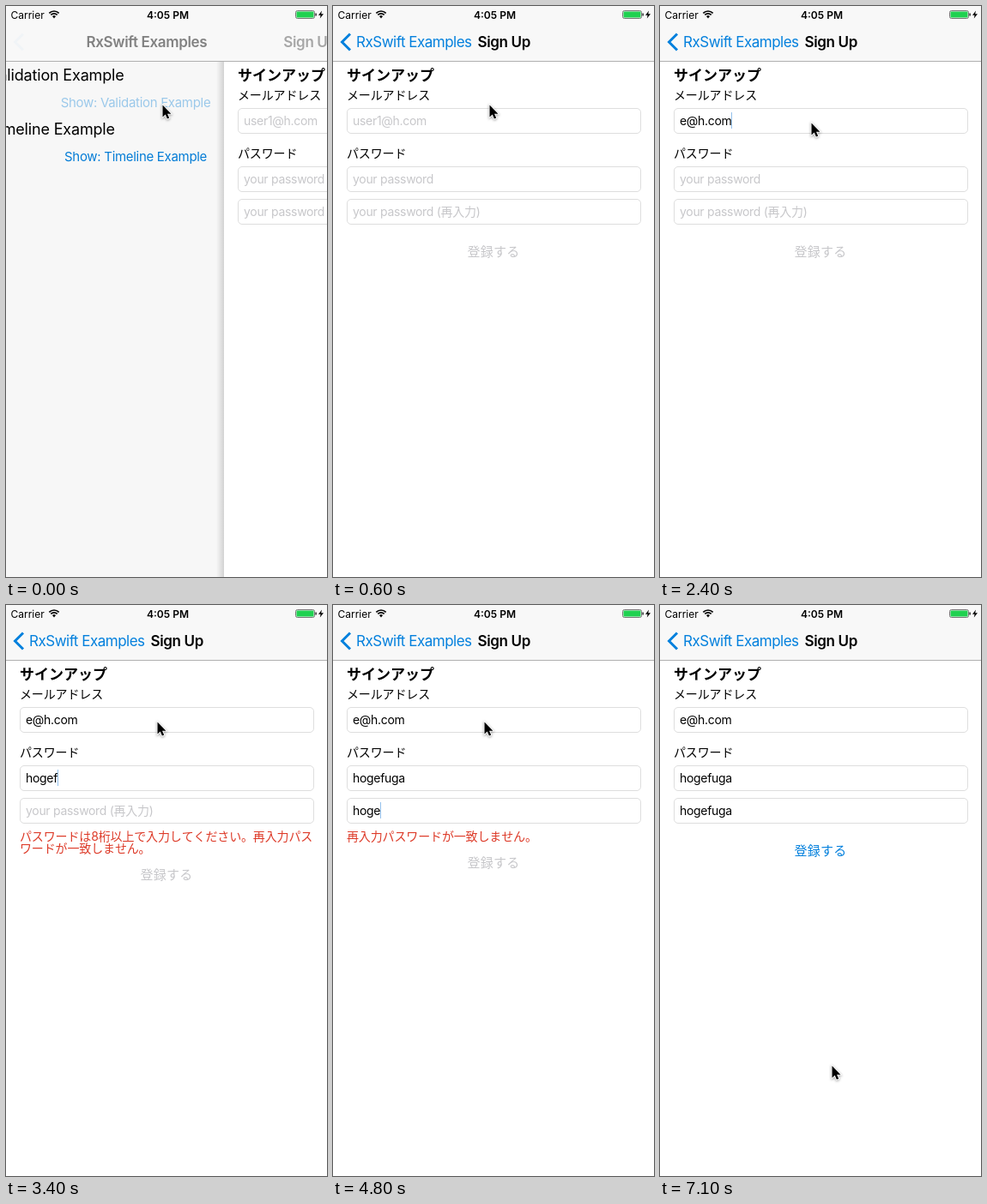
These frames come from a looping animation (374 by 666 pixels, 7.2 s). An HTML page with a canvas:

```html
<!DOCTYPE html>
<html lang="ja">
<head>
<meta charset="utf-8">
<title>Sign Up</title>
<style>
html, body { margin: 0; width: 100%; height: 100%; overflow: hidden; background: #fff; }
canvas { display: block; width: 374px; height: 666px; }
</style>
</head>
<body>
<canvas id="stage"></canvas>
<script>
const W = 374, H = 666, LOOP = 7200, STEP = 100;
const BLUE = '#0480dd', RED = '#dd3a28', PALE = '#c7c7ca', BLACK = '#000';
const FAMILY = 'Inter, "Noto Sans CJK JP", sans-serif';
const EMAIL = 'e@h.com', PASSWORD = 'hogefuga';

const canvas = document.getElementById('stage');
const ctx = canvas.getContext('2d');
const ratio = window.devicePixelRatio || 1;
canvas.width = W * ratio;
canvas.height = H * ratio;

const clamp = v => Math.max(0, Math.min(1, v));
const smooth = v => v * v * (3 - 2 * v);

function text(str, x, y, { size = 14, weight = 400, color = BLACK, spacing = 0, align = 'left', alpha = 1 } = {}) {
  ctx.save();
  ctx.font = `${weight} ${size}px ${FAMILY}`;
  ctx.letterSpacing = spacing + 'px';
  ctx.textAlign = align;
  ctx.fillStyle = color;
  ctx.globalAlpha = alpha;
  ctx.fillText(str, x, y);
  const width = ctx.measureText(str).width;
  ctx.restore();
  return width;
}

function polygon(points) {
  ctx.beginPath();
  points.forEach(([x, y]) => ctx.lineTo(x, y));
  ctx.closePath();
}

// Part of `str` typed so far, given the time of each keystroke.
const typed = (str, t, times) => str.slice(0, times.filter(at => t >= at).length);
const steady = (start, count) => Array.from({ length: count }, (_, i) => start + i * STEP);

function formState(t) {
  const email = typed(EMAIL, t, [1300, 1500, 1800, ...steady(2000, 4)]);
  const password = typed(PASSWORD, t, steady(3000, 8));
  const repeat = typed(PASSWORD, t, steady(4500, 8));
  const emailError = email && email.length < 6 ? ['メールアドレスを正しく入力してください。'] : [];
  let passwordError = [];
  if (password && password.length < 8) {
    passwordError = ['パスワードは8桁以上で入力してください。再入力パス', 'ワードが一致しません。'];
  } else if (password !== repeat) {
    passwordError = ['再入力パスワードが一致しません。'];
  }
  let focus = -1;
  if (t >= 1200 && t < 6000) focus = t < 2800 ? 0 : t < 4100 ? 1 : 2;
  return { email, password, repeat, emailError, passwordError, focus, ready: repeat === PASSWORD };
}

function field(y, value, hint, caretAlpha) {
  ctx.beginPath();
  ctx.roundRect(16.5, y + .5, 342, 29, 4.5);
  ctx.fillStyle = '#fff';
  ctx.fill();
  ctx.strokeStyle = '#dedede';
  ctx.lineWidth = 1;
  ctx.stroke();
  const width = text(value || hint, 23, y + 20, { color: value ? BLACK : PALE, spacing: -.3 });
  if (caretAlpha) {
    ctx.globalAlpha = caretAlpha;
    ctx.fillStyle = '#3c8fdc';
    ctx.fillRect(Math.floor(23 + (value ? width : 0)), y + 5, 1, 19);
    ctx.globalAlpha = 1;
  }
}

function signUpPage(t, x) {
  const s = formState(t);
  const label = { spacing: -.14 };
  const error = { ...label, color: RED };
  const caret = i => s.focus === i ? (t >= 5600 ? .3 : .55) : 0;
  ctx.save();
  ctx.translate(x, 0);
  if (x > 0) {
    const shade = ctx.createLinearGradient(-9, 0, 0, 0);
    shade.addColorStop(0, 'rgba(0,0,0,0)');
    shade.addColorStop(1, `rgba(0,0,0,${.22 * x / W})`);
    ctx.fillStyle = shade;
    ctx.fillRect(-9, 64, 9, H);
  }
  ctx.fillStyle = '#fff';
  ctx.fillRect(0, 64, W, H);
  text('サインアップ', 16, 86.5, { size: 17, weight: 700 });
  text('メールアドレス', 16, 109, label);
  field(119, s.email, 'user1@h.com', caret(0));
  s.emailError.forEach(line => text(line, 16, 169, error));
  let shift = 14 * s.emailError.length;
  text('パスワード', 16, 177 + shift, label);
  field(187 + shift, s.password, 'your password', caret(1));
  field(225 + shift, s.repeat, 'your password (再入力)', caret(2));
  s.passwordError.forEach((line, i) => text(line, 16, 275 + shift + 14 * i, error));
  shift += 14 * s.passwordError.length;
  const pressed = t >= 6100 && t < 6400;
  text('登録する', 187, 291.5 + shift, {
    size: 15, spacing: .2, align: 'center', color: s.ready ? BLUE : PALE, alpha: pressed ? .35 : 1
  });
  ctx.restore();
}

function menuPage(t, progress) {
  ctx.save();
  ctx.translate(-112 * progress, 0);
  const heading = { size: 18, spacing: -.17 };
  const link = { size: 15, spacing: -.3, align: 'center', color: BLUE };
  text('Validation Example', 16, 87, heading);
  text('Show: Validation Example', 187, 118, { ...link, alpha: t < 100 ? .38 : 1 });
  text('Timeline Example', 16, 150, heading);
  text('Show: Timeline Example', 187, 181, link);
  ctx.restore();
  ctx.fillStyle = `rgba(0,0,0,${.1 * progress})`;
  ctx.fillRect(0, 64, W, H);
}

function statusBar() {
  text('Carrier', 5.5, 14.5, { size: 12 });
  text('4:05 PM', 188.5, 14.5, { size: 12, weight: 600, align: 'center' });
  ctx.strokeStyle = ctx.fillStyle = BLACK;
  ctx.lineWidth = 1.7;
  [5.2, 8].forEach(r => {
    ctx.beginPath();
    ctx.arc(56, 14, r, -Math.PI * .75, -Math.PI * .25);
    ctx.stroke();
  });
  ctx.beginPath();
  ctx.moveTo(56, 14.5);
  ctx.arc(56, 14, 2.8, -Math.PI * .75, -Math.PI * .25);
  ctx.fill();

  ctx.lineWidth = 1;
  ctx.strokeStyle = '#777';
  ctx.beginPath();
  ctx.roundRect(337.5, 5.5, 22, 9, 2);
  ctx.stroke();
  ctx.fillStyle = '#1fd150';
  ctx.fillRect(338.5, 6.5, 20, 7);
  ctx.fillStyle = BLACK;
  ctx.fillRect(360.5, 8.5, 1.2, 3);
  polygon([[368, 5.5], [364, 10.7], [366.6, 10.7], [365.8, 14.5], [370, 9.2], [367.2, 9.2]]);
  ctx.fill();
}

function navBar(t, remain) {
  ctx.fillStyle = '#f8f8f8';
  ctx.fillRect(0, 0, W, 64);
  ctx.fillStyle = '#b0b0b0';
  ctx.fillRect(0, 64, W, 1);
  statusBar();

  const backAlpha = clamp((t - 100) / 400);
  const backX = 27 + 98 * remain;
  const titleAlpha = clamp(.48 - t / 300);
  const back = { size: 17, spacing: -.5, color: BLUE, alpha: backAlpha };
  const title = { size: 17, spacing: -.35, weight: 600 };
  text('RxSwift Examples', backX, 48, back);
  text('RxSwift Examples', backX, 48, { ...title, alpha: titleAlpha });
  text('Sign Up', 168.5 + 228 * remain, 48, { ...title, alpha: clamp(.33 + t / 290) });

  ctx.globalAlpha = Math.max(.03, backAlpha);
  ctx.strokeStyle = BLUE;
  ctx.lineWidth = 3;
  ctx.beginPath();
  ctx.moveTo(20, 32.5);
  ctx.lineTo(10.5, 42);
  ctx.lineTo(20, 51.5);
  ctx.stroke();
  ctx.globalAlpha = 1;
}

const pointerPath = [
  [0, 182, 115], [900, 182, 115], [1200, 176, 136], [5300, 176, 136],
  [5700, 193, 283], [6700, 193, 283], [7100, 200, 537]
];

function pointer(t) {
  const next = Math.max(1, pointerPath.findIndex(([at]) => at >= t));
  const [t0, x0, y0] = pointerPath[next - 1];
  const [t1, x1, y1] = pointerPath[next];
  const k = smooth(clamp((t - t0) / (t1 - t0)));
  ctx.save();
  ctx.translate(x0 + (x1 - x0) * k, y0 + (y1 - y0) * k);
  polygon([[.5, .5], [.5, 14.5], [3.7, 11.6], [5.9, 16.6], [8.2, 15.6], [6, 10.7], [10.4, 10.7]]);
  ctx.shadowColor = 'rgba(0,0,0,.4)';
  ctx.shadowBlur = 3 * ratio;
  ctx.shadowOffsetY = ratio;
  ctx.strokeStyle = '#fff';
  ctx.lineWidth = 1.8;
  ctx.stroke();
  ctx.shadowColor = 'transparent';
  ctx.fillStyle = BLACK;
  ctx.fill();
  ctx.restore();
}

function draw(now) {
  const t = Math.floor(now % LOOP / STEP) * STEP;
  // Critically damped spring, already under way when the loop begins.
  const u = 1.155 + 17 * t / 1000;
  const remain = t < 700 ? (1 + u) * Math.exp(-u) : 0;
  ctx.setTransform(ratio, 0, 0, ratio, 0, 0);
  ctx.fillStyle = '#fff';
  ctx.fillRect(0, 0, W, H);
  if (remain) menuPage(t, 1 - remain);
  signUpPage(t, Math.round(W * remain));
  navBar(t, remain);
  pointer(t);
}

const start = performance.now();
function tick() {
  draw(performance.now() - start);
  requestAnimationFrame(tick);
}
tick();
</script>
</body>
</html>
```
